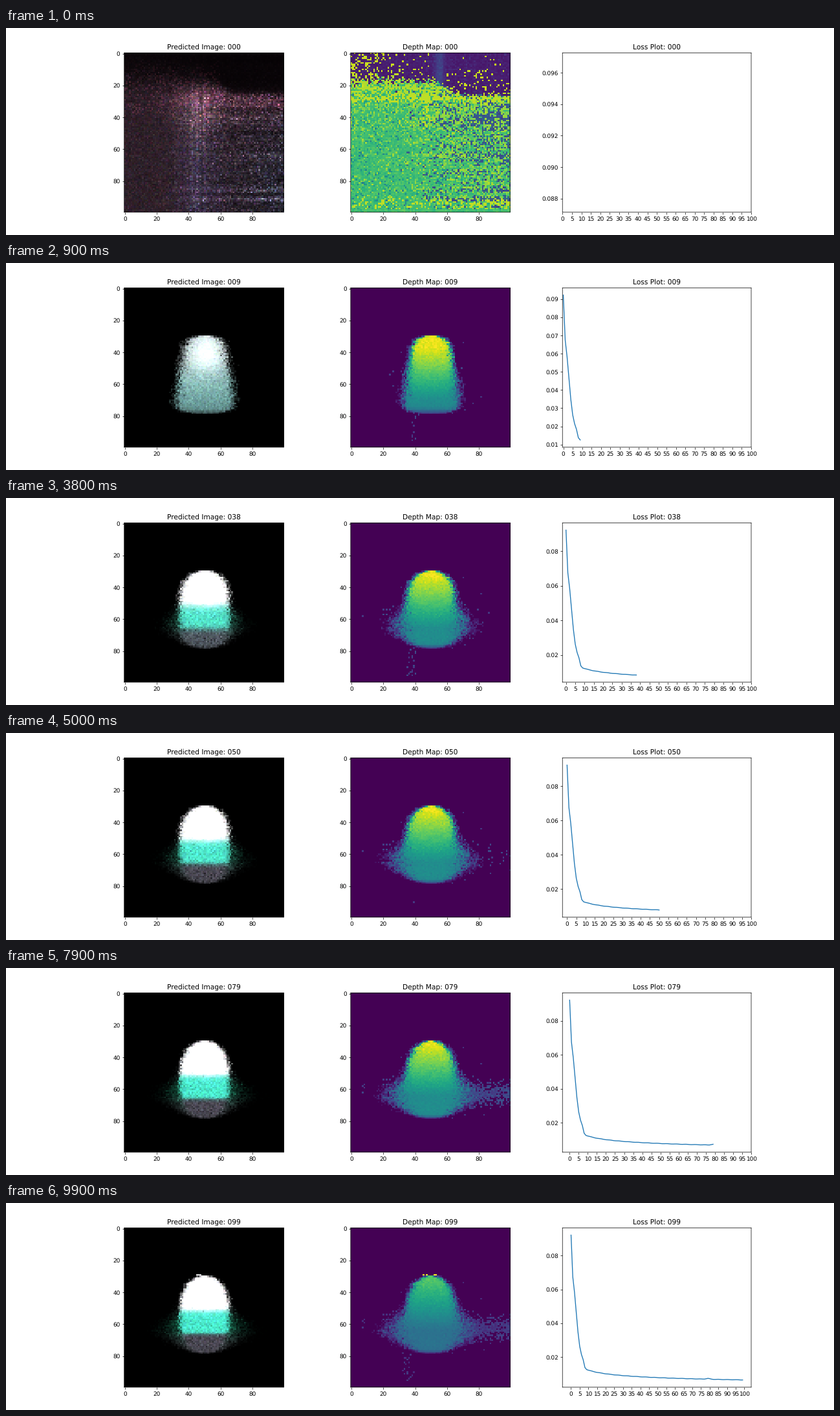
Recreate the animation shown at these times as a matplotlib script. Size 1280 by 320 pixels, loop 10000 ms.

```python
import numpy as np
import matplotlib.pyplot as plt
from matplotlib.animation import FuncAnimation

N = 100
EPOCHS = 100
rng = np.random.default_rng(7)
Y, X = np.mgrid[0:N, 0:N].astype(float)
SIDE = np.abs(X - 49.8)

# Persistent grain, so speckles drift slowly instead of flickering
GRAIN = rng.normal(size=(2, N, N))
EDGE = rng.normal(size=(2, N, N))
SPECK = rng.random((N, N))
TINT = rng.normal(size=(N, N, 3))


def bump(v, mid, width):
    return np.exp(-((v - mid) / width) ** 2)


def sigmoid(v):
    return 1 / (1 + np.exp(-np.clip(v, -40, 40)))


def ramp(v, start, end):
    return np.clip((v - start) / (end - start), 0, 1)


def mix(a, b, t):
    return (1 - t) * np.asarray(a) + t * np.asarray(b)


def settle(k, pace):
    """Ease from 0 at epoch 9 towards 1."""
    return 1 - np.exp(-max(k - 9, 0) / pace)


def drift(fields, k):
    return fields[0] * np.cos(.03 * k) + fields[1] * np.sin(.03 * k)


def shade(weight, color):
    return weight[..., None] * np.asarray(color)


def loss_curve():
    k = np.arange(EPOCHS)
    drop = [92.2, 67.5, 58.3, 46.5, 34.8, 26.3, 21.5, 18.4, 13.8]
    tail = 12.6 * (np.maximum(k, 9) / 9) ** -.28
    tail += .45 * bump(k, 79, 1.5) + .07 * np.sin(1.2 * k)
    tail[:len(drop)] = drop
    return tail / 1000


def row_bands():
    raw = rng.normal(size=N + 2)
    return np.convolve(raw, [.6, .8, .6], "valid")[:, None]


def sky_line():
    """Row where the dark upper part ends, rougher on the left."""
    rough = mix(3, .6, ramp(X, 20, 65)) * rng.normal(size=(N, N))
    return 17 + 9 * sigmoid((X - 60) / 3) + rough


def start_image(bands, top):
    lit = .1 + .9 * sigmoid((Y - top) / mix(5, 1.2, ramp(X, 20, 65)))
    lit = np.maximum(lit, .45 * bump(X, 47, 5) * ramp(Y, 0, 25))
    base = np.full((N, N, 3), [41., 30, 37])
    base += shade(bump(X, 46, 12) * bump(Y, 38, 15), [50, 38, 42])
    base += shade(bump(Y, 29, 6) * ramp(X, 15, 45), [44, 24, 32])
    base += shade(bump(X, 46, 13) * ramp(Y, 35, 60), [18, 20, 32])
    base += shade(ramp(X, 50, 100) * ramp(Y, 30, 70), [2, 14, 18])
    right = ramp(X, 20, 90)
    grain = (.14 + .28 * right) * rng.normal(size=(N, N)) + .25 * right * bands
    grain += .12 * rng.normal(size=(1, N)) * bump(X, 48, 14)
    img = base * (lit * np.exp(grain))[..., None] * (1 + .12 * TINT)
    red = (rng.random((N, N)) < .15) * ramp(Y, 2, 22) * (Y < 40) * (X < 60)
    return np.clip((img + shade(red, [36, 12, 18]) + [5, 2, 4]) / 255, 0, 1)


def start_depth(bands, top):
    u, v = rng.random((2, N, N))
    n = rng.normal(size=(N, N))
    right = ramp(X, 30, 85)
    lime = .1 + .25 * bump(Y, 32, 20) + .45 * right + .12 * bands * ramp(X, 0, 50)
    d = np.where(u < lime, .83 + .03 * n, .69 + .03 * n)
    d = np.where(v < .07 + .2 * bump(X, 55, 4), .5 + .05 * n, d)
    blue = right * (.46 + .2 * bands) * (1 - .4 * bump(Y, 75, 16))
    d = np.where(v < blue, .28 + .04 * n, d)
    gold = .6 * bump(X, 47, 2) * (Y < 49) + .75 * bump(Y, 28, 2.5)
    gold += (.25 + .3 * right) * bump(Y, 94, 3)
    d = np.where(u < gold, .9, d)
    d = np.where(Y > 97, .7 + .03 * n, d)

    stars = .03 + .24 * sigmoid((22 - X) / 6) + .1 * ramp(Y, 8, 18)
    sky = .06 + .03 * np.abs(n) + .12 * bump(X, 55, 3)
    d = np.where(Y < top, np.where(u < stars, .92, sky), d)
    rim = (Y >= top) & (Y < 26) & (u < .6)
    return np.clip(np.where(rim, .88, d), 0, 1)


def outlines(k):
    """Half widths of the solid body and of the cloud around it."""
    late = settle(k, 15)
    body = mix(15 + .17 * (Y - 54), 15.3, late)
    cap = np.clip(1 - np.abs((Y - 54) / 24.5) ** mix(10, 2.6, late), 0, 1) ** .5
    core = cap * body - 8 * (cap == 0)
    cloud = core + 12 * settle(k, 35) * bump(Y, 65, 10) * (cap > 0)
    return core, cloud


def coverage(width, soft, k):
    a = sigmoid((width - SIDE) / soft + .8 * drift(EDGE, k))
    return np.where(a < .08, 0, a)


def body_colors(k, grain):
    late = settle(k, 15)
    white = mix([.86, .92, .92], [1.12, 1.12, 1.12], ramp(k, 9, 19))
    band = mix([.53, .74, .73], [.29, .92, .81], late)
    base = mix([.40, .60, .59], [.28, .27, .31], ramp(k, 19, 42))
    upper = sigmoid((51.5 - Y) / mix(4.5, .8, late))
    lower = sigmoid((Y - 66) / mix(4, .6, late))
    color = (shade(upper, white) + shade(lower, base)
             + shade(np.clip(1 - upper - lower, 0, 1), band))
    color += .22 * (bump(X, 51, 8) * bump(Y, 42, 9))[..., None]
    rough = .03 + .04 * sigmoid(Y - 51) + .1 * sigmoid(Y - 66) * late
    return color * (1 + rough * grain)[..., None] * (1 + .025 * TINT)


def strays(k, cloud):
    """Loose points: halo, tail to the right, drip below."""
    out = np.maximum(SIDE - cloud, 0)
    chance = .1 * np.exp(-out / 4) * bump(Y, 60, 20)
    chance += .12 * settle(k, 35) * bump(Y, 62, 8) * np.exp(-out / 9)
    chance += .85 * ramp(k, 35, 80) ** 2 * bump(Y, 63, 6) * (X > 68)
    drip = .3 * (bump(k, 26, 14) + bump(k, 99, 9))
    chance += drip * bump(X, 39 - .045 * k, 2.6) * (Y > 77) * (Y < 96)
    return SPECK < chance


def scene(k):
    """Predicted colours and depth after epoch k."""
    if k == 0:
        return IMAGE0, DEPTH0
    early = max(0, 9 - k) / 8
    late = settle(k, 25)
    blur = 1 + 5 * early ** 1.5
    grain = drift(GRAIN, k)
    core, cloud = outlines(k)
    floor = sigmoid((77.6 - Y) / (mix(1.3, .5, late) * blur))
    soft = .9 + (.6 + 2.2 * late) * bump(Y, 64, 10)
    core_a = floor * coverage(core, mix(1.5, .7, late) * blur, k)
    cloud_a = floor * coverage(cloud, soft * blur, k)

    green = bump(Y, 60, 9)
    glow = shade(green, mix([.3, .5, .47], [.08, .37, .27], late))
    glow += shade(1 - green, [.24, .24, .26])
    fade = np.exp(-np.maximum(SIDE - core, 0) / 12)
    halo = (1 - core_a) * cloud_a * fade * np.clip(1 + .3 * grain, 0, 2)
    img = core_a[..., None] * body_colors(k, grain) + halo[..., None] * glow
    img *= 1 - .55 * early

    depth = np.clip(.97 - .0148 * (Y - mix(37, 31, late)), .49, .97)
    depth = depth * (1 + .025 * grain) * cloud_a
    faint = .16 + .1 * (SPECK * 37 % 1)
    depth = np.where(strays(k, cloud), np.maximum(depth, faint), depth)

    # Far points on the top edge stretch the colour scale near the end
    peak = 1 + .3 * ramp(k, 80, 99)
    if peak > 1:
        depth[29, [45, 47, 52, 53]] = peak
        img[29, 45:48] = .85
    depth = depth / peak

    rest = .5 * early ** 4
    return (np.clip(mix(img, IMAGE0, rest), 0, 1),
            np.clip(mix(depth, DEPTH0, rest), 0, 1))


LOSS = loss_curve()
BANDS, SKY = row_bands(), sky_line()
IMAGE0, DEPTH0 = start_image(BANDS, SKY), start_depth(BANDS, SKY)

plt.rcParams.update({
    "font.family": "DejaVu Sans",
    "text.hinting": "no_hinting",
    "path.snap": False,
})
fig, axes = plt.subplots(1, 3, figsize=(20, 5), dpi=64)
ax_img, ax_depth, ax_loss = axes
picture = ax_img.imshow(IMAGE0, interpolation="nearest")
depth_map = ax_depth.imshow(DEPTH0, cmap="viridis", vmin=0, vmax=1,
                            interpolation="nearest")
line, = ax_loss.plot([], [])
ax_loss.set_xticks(np.arange(0, 101, 5))


def update(k):
    img, depth = scene(k)
    picture.set_data(img)
    depth_map.set_data(depth)
    seen = LOSS[:k + 1]
    line.set_data(np.arange(k + 1), seen)

    lo, hi = seen.min(), seen.max()
    if k == 0:
        lo, hi = .95 * lo, 1.05 * hi
    pad = .05 * (hi - lo)
    ax_loss.set_ylim(lo - pad, hi + pad)
    ax_loss.set_xlim(-.05 * max(k, 1), max(100, 1.05 * k))

    for ax, name in zip(axes, ("Predicted Image", "Depth Map", "Loss Plot")):
        ax.set_title(f"{name}: {k:03d}")
    return picture, depth_map, line


anim = FuncAnimation(fig, update, frames=EPOCHS, interval=100, repeat=True,
                     repeat_delay=0, blit=False)
plt.show()
```
